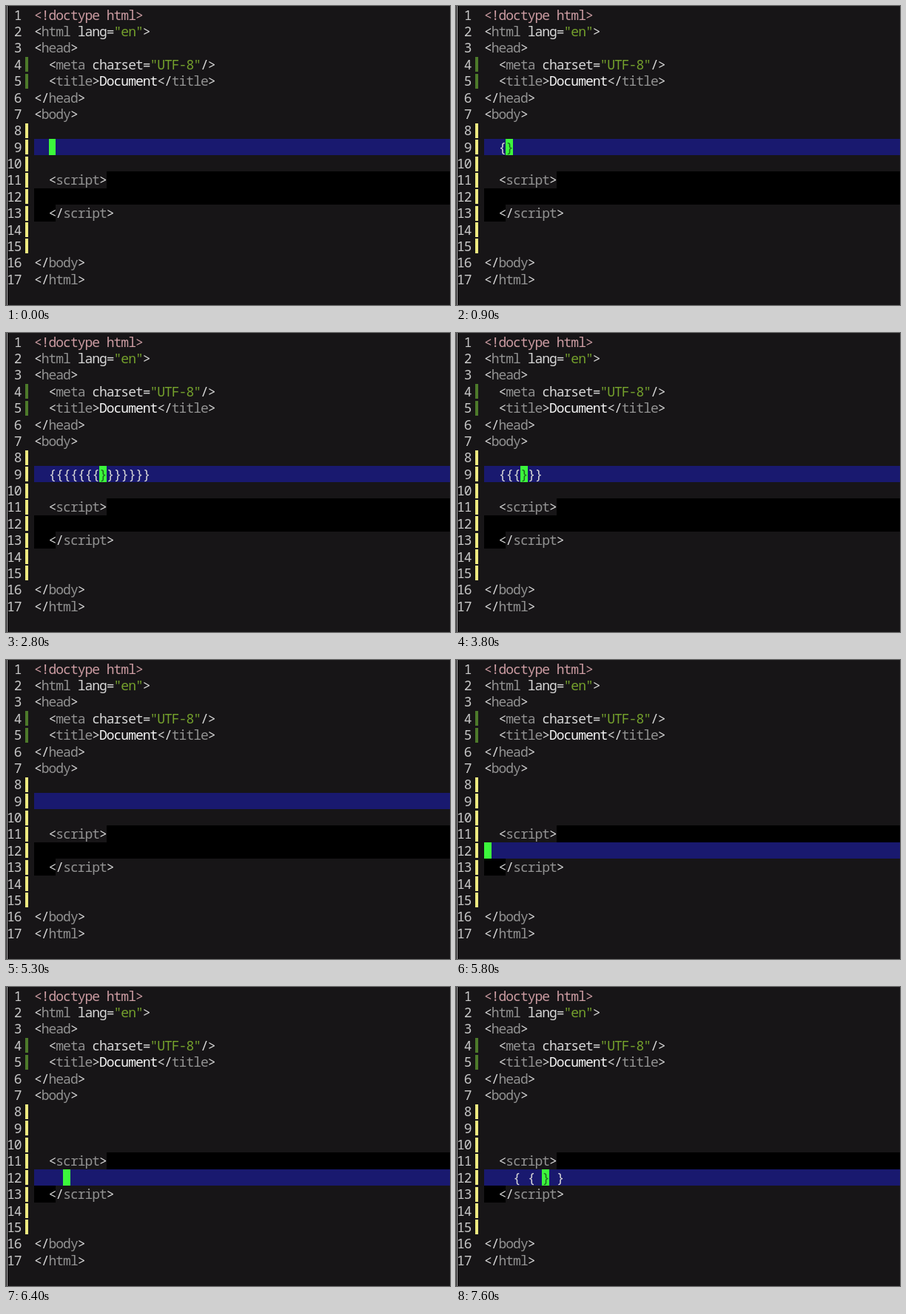
Write an HTML page that moves like this. It is 600 px wide and 405 px high and loops after 8000 ms.

```html
<!DOCTYPE html>
<html lang="en">
<head>
<meta charset="UTF-8">
<title>Editor</title>
<style>
  html, body { margin: 0; width: 100%; height: 100%; overflow: hidden; background: #171517; }
  #stage {
    position: relative; width: 600px; height: 405px; overflow: hidden;
    font: 18px/23px "Noto Sans Mono", "DejaVu Sans Mono", monospace;
    letter-spacing: -1.02px; font-variant-ligatures: none; color: #d8d8d8;
  }
  #stage div { position: absolute; white-space: pre; height: 22.38px; }
  #stage .edge { left: 1px; top: 0; width: 1px; height: 100%; background: #b4b4b4; }
  .num { left: 0; width: 20.5px; text-align: right; color: #c8c8c8; }
  .mark { left: 26px; width: 4px; }
  .tag { color: #929292; }
  .doc { color: #cc9ca2; }
  .str { color: #74a02c; }
  .title { color: #f4f4f4; }
  #bar { left: 38px; right: 0; background: #19196f; }
  #cursor { width: 9.78px; background: #3cf73c; color: #1d6420; }
</style>
</head>
<body>
<div id="stage"></div>
<script>
const LEFT = 38, CELL = 9.78, PITCH = 22.38, LOOP = 8000;
const stage = document.getElementById('stage');
const rowTop = row => 0.6 + PITCH * (row - 1);
const colLeft = col => LEFT + CELL * col;

function add(css, row, html = '') {
  const el = document.createElement('div');
  el.className = css;
  if (row) el.style.top = rowTop(row) + 'px';
  el.innerHTML = html;
  stage.append(el);
  return el;
}

function block(row, from, to) {
  const el = add('', row);
  el.style.left = colLeft(from) + 'px';
  el.style.width = (to ? CELL * (to - from) : 600) + 'px';
  el.style.background = '#000';
}

const span = (css, text) => `<span class="${css}">${text}</span>`;
const open = (name, attrs = '', end = '&gt;') => '&lt;' + span('tag', name) + attrs + end;
const close = name => '&lt;/' + span('tag', name) + '&gt;';

const code = {
  1: span('doc', '&lt;!doctype html&gt;'),
  2: open('html', ' lang=' + span('str', '"en"')),
  3: open('head'),
  4: '  ' + open('meta', ' charset=' + span('str', '"UTF-8"'), '/&gt;'),
  5: '  ' + open('title') + span('title', 'Document') + close('title'),
  6: close('head'),
  7: open('body'),
  11: '  ' + open('script'),
  13: '  ' + close('script'),
  16: close('body'),
  17: close('html')
};

block(11, 10);
block(12, 0);
block(13, 0, 3);

const bar = add('', 9);
bar.id = 'bar';

add('edge');
for (let row = 1; row <= 17; row++) {
  add('num', row, row);
  const saved = row === 4 || row === 5;
  if (saved || (row > 7 && row < 16)) {
    const mark = add('mark', row);
    mark.style.background = saved ? '#4d7a2a' : '#eeea80';
    mark.style.height = '20px';
    mark.style.marginTop = '1.5px';
  }
  if (code[row]) add('', row, code[row]).style.left = LEFT + 'px';
}

const typed = add('', 9);
typed.style.left = LEFT + 'px';
const cursor = add('', 9);
cursor.id = 'cursor';

// Each step: start time, row, cursor column (-1 hides it), line text
const pairs = (time, n) => [time, 9, 2 + n, '  ' + '{'.repeat(n) + '}'.repeat(n)];
const steps = [
  pairs(0, 0),
  pairs(800, 1), pairs(1200, 2), pairs(1500, 3), pairs(1800, 4),
  pairs(2100, 5), pairs(2300, 6), pairs(2600, 7),
  pairs(3200, 6), pairs(3400, 5), pairs(3500, 4), pairs(3700, 3),
  pairs(4200, 2), pairs(4500, 1), pairs(4700, 0),
  [4900, 9, 0, ''],
  [5200, 9, -1, ''],
  [5400, 10, 0, ''],
  [5600, 11, 0, ''],
  [5700, 12, 0, ''],
  [6200, 12, 2, ''],
  [6400, 12, 4, ''],
  [6900, 12, 5, '    {}'],
  [7200, 12, 6, '    {  }'],
  [7500, 12, 7, '    { {} }'],
  [7600, 12, 8, '    { { } }']
];

let shown = null;

function draw() {
  const now = performance.now() % LOOP;
  const step = steps.findLast(s => s[0] <= now);
  if (step !== shown) {
    shown = step;
    const [, row, col, text] = step;
    for (const el of [bar, typed, cursor]) el.style.top = rowTop(row) + 'px';
    typed.textContent = text;
    cursor.textContent = text[col] || '';
    cursor.style.left = colLeft(col) + 'px';
    cursor.style.visibility = col < 0 ? 'hidden' : 'visible';
  }
  requestAnimationFrame(draw);
}
draw();
</script>
</body>
</html>
```
